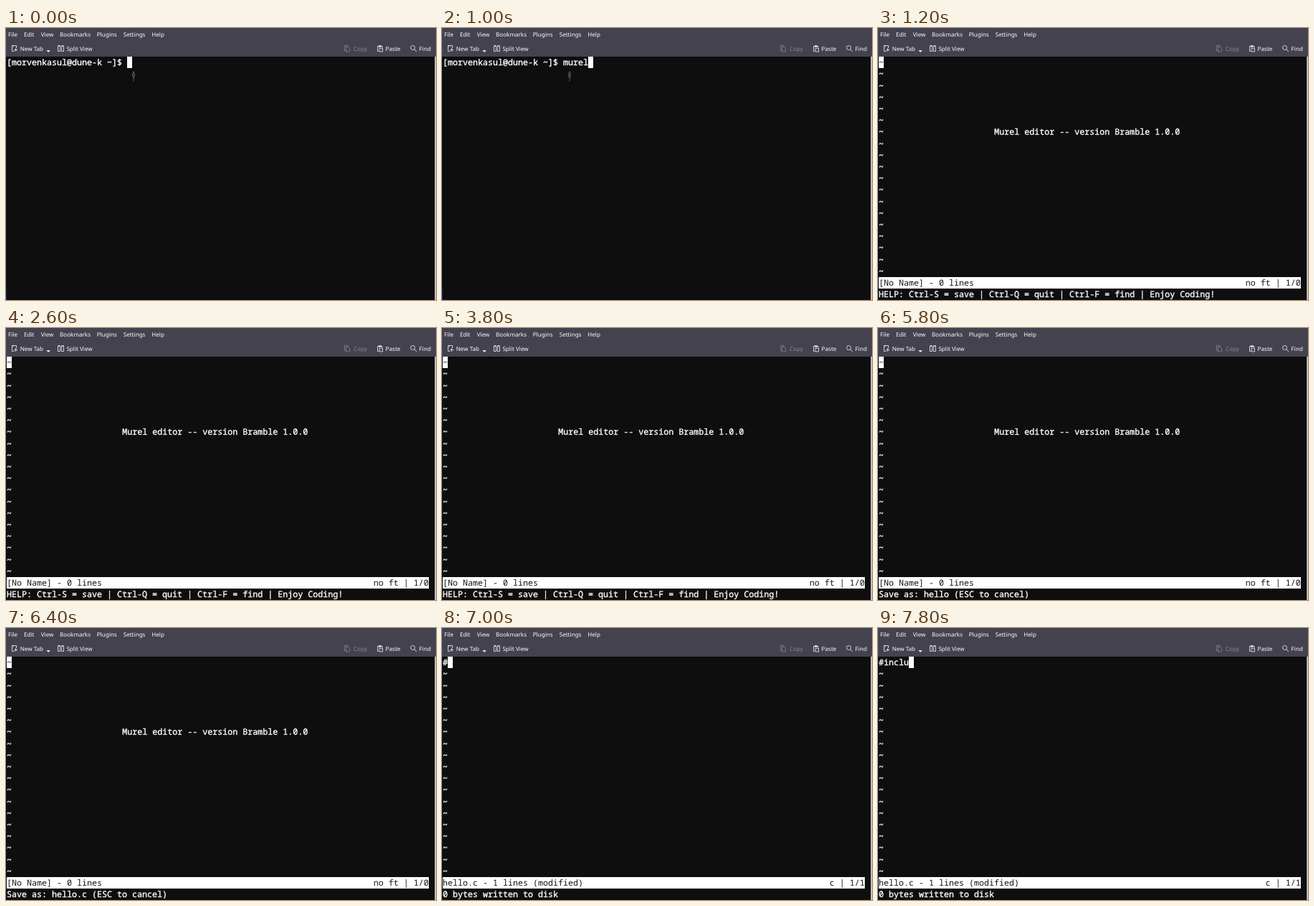
These frames come from a looping animation (600x380 px, 8000 ms). An HTML page:

```html
<!DOCTYPE html>
<html lang="en">
<head>
<meta charset="utf-8">
<title>Terminal editor</title>
<style>
  html, body { margin: 0; width: 100%; height: 100%; overflow: hidden; background: #0e0e0e; }
  svg { display: block; width: 100%; height: 100%; }
  text { white-space: pre; text-rendering: geometricPrecision; }
  .ui { font: 8.1px "Noto Sans", sans-serif; fill: #fcfcfc; }
  .term { font: 11.683px "Noto Sans Mono", monospace; fill: #fff; }
  .term text { stroke: #fff; stroke-width: .35; }
  .term .dark { fill: #141414; stroke: none; }
  .icon { fill: none; stroke: #f4f4f5; stroke-width: .8; }
  .dim { opacity: .36; }
</style>
</head>
<body>
<svg viewBox="0 0 600 380">
  <rect width="600" height="380" fill="#0e0e0e"/>
  <rect width="600" height="40" fill="#44424e"/>
  <rect x="598.3" y="40" width="1.7" height="340" fill="#cfcfd1"/>

  <g class="ui" id="bar"></g>

  <g class="icon">
    <path d="M11.5 32.5H8.5V24.5H14.5V28M10 24.5V26.5M13.6 28V33M11.1 30.5H16.1"/>
    <path d="M72.5 25.5H75.6V32.5H72.5ZM77.4 25.5H80.5V32.5H77.4ZM72.5 24.6H75.6M77.4 24.6H80.5"/>
    <path class="dim" d="M474 31.5H472.5V24.5H477V26M474.5 26.5H477.5L479.5 28.5V33H474.5Z"/>
    <path d="M520 32.5H518.5V25.5H525V27.5M520.3 24.6H523.2V26.4H520.3ZM521 28.3H525.5V33H521Z"/>
    <circle cx="567.6" cy="27.6" r="3"/>
    <path d="M569.8 29.8L573 33"/>
  </g>
  <path d="M56.3 31.2H62L59.15 34Z" fill="#f4f4f5"/>

  <g class="term" id="screen"></g>

  <g id="shell">
    <path d="M178 60L180 65.5L178.8 70V75H177.2V70L176 65.5Z" fill="#36363d"/>
    <path d="M178 60.5L179.8 65.5L178 70.5L176.2 65.5Z" fill="none" stroke="#65656f" stroke-width=".7"/>
    <rect y="365" width="1" height="15" fill="#20204c"/>
  </g>
</svg>
<script>
const LOOP = 8000, COL = 7.01, ROW = 16.2, TOP = 40, LEFT = 1;
const COLS = 84, STATUS = 19, MESSAGE = 20;
const PROMPT = '[morvenkasul@dune-k ~]$ ';
const COMMAND = 'murel';
const WELCOME = 'Murel editor -- version Bramble 1.0.0';
const HELP = 'HELP: Ctrl-S = save | Ctrl-Q = quit | Ctrl-F = find | Enjoy Coding!';

// Times at which each character has been typed
const COMMAND_KEYS = [200, 400, 600, 800, 1000];
const NAME_KEYS = [5200, 5400, 5600, 5600, 5800, 6200, 6400];
const CODE_KEYS = [7000, 7200, 7400, 7600, 7600, 7800];
const OPEN = 1200, ASK = 5000, SAVED = 7000;

const $ = id => document.getElementById(id);
const colX = col => LEFT + col * COL;
const rowY = row => TOP + row * ROW;
const label = (x, y, s, cls = '') => `<text x="${x}" y="${y}" class="${cls}">${s}</text>`;
const put = (col, row, s, cls) => label(colX(col), Math.round(rowY(row) + 12.2), s, cls);
const typed = (s, keys, t) => s.slice(0, keys.filter(k => k <= t).length);

// Filled cells snap to whole pixels
function block(col, row, n = 1) {
  const x = Math.round(colX(col)), y = Math.round(rowY(row));
  const w = Math.round(colX(col + n)) - x, h = Math.round(rowY(row + 1)) - y;
  return `<rect x="${x}" y="${y}" width="${w}" height="${h}"/>`;
}

const menu = [[3, 'File'], [25, 'Edit'], [48.7, 'View'], [75, 'Bookmarks'],
  [126.7, 'Plugins'], [163.7, 'Settings'], [203.3, 'Help']];
const tools = [[19.7, 'New Tab'], [84.4, 'Split View'], [485, 'Copy', 'dim'],
  [529.6, 'Paste'], [576.6, 'Find']];
$('bar').innerHTML = menu.map(([x, s]) => label(x, 12.4, s)).join('') +
  tools.map(([x, s, cls]) => label(x, 31.8, s, cls)).join('');

function shell(t) {
  const line = PROMPT + typed(COMMAND, COMMAND_KEYS, t);
  return put(0, 0, line) + block(line.length, 0);
}

function tildes(from) {
  let out = '';
  for (let row = from; row < STATUS; row++) out += put(0, row, '~');
  return out;
}

function footer(left, right, message) {
  return block(0, STATUS, COLS) + put(0, STATUS, left, 'dark') +
    put(COLS - right.length, STATUS, right, 'dark') + put(0, MESSAGE, message);
}

function editor(t) {
  if (t >= SAVED) {
    const code = typed('#include', CODE_KEYS, t);
    return put(0, 0, code) + block(code.length, 0) + tildes(1) +
      footer('hello.c - 1 lines (modified)', 'c | 1/1', '0 bytes written to disk');
  }
  const ask = `Save as: ${typed('hello.c', NAME_KEYS, t)} (ESC to cancel)`;
  return block(0, 0) + put(0, 0, '~', 'dark') + tildes(1) + put(23, 6, WELCOME) +
    footer('[No Name] - 0 lines', 'no ft | 1/0', t < ASK ? HELP : ask);
}

let last = '';
function draw(t) {
  const html = t < OPEN ? shell(t) : editor(t);
  if (html === last) return;
  last = html;
  $('screen').innerHTML = html;
  $('shell').style.display = t < OPEN ? '' : 'none';
}

const start = performance.now();
function tick() {
  draw((performance.now() - start) % LOOP);
  requestAnimationFrame(tick);
}
tick();
</script>
</body>
</html>
```
